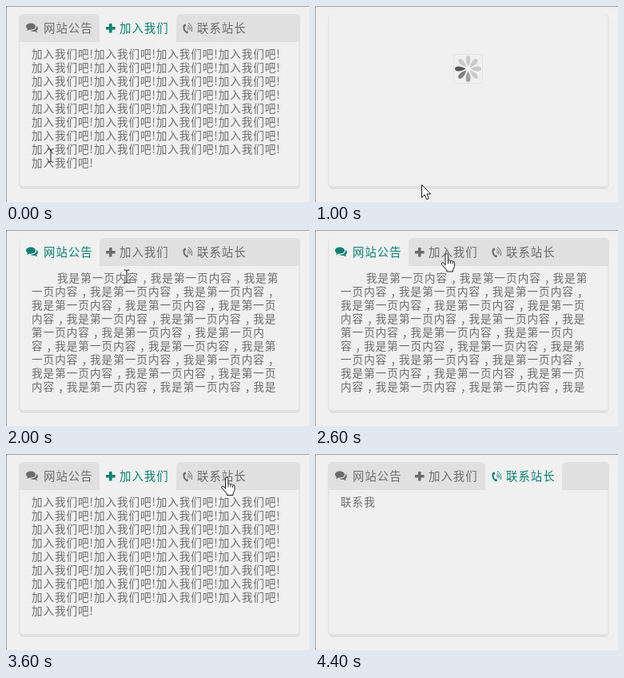
Animation of 379 by 245 pixels, one loop 5200 ms. Source, as an HTML page:

```html
<!DOCTYPE html>
<html lang="zh-CN">
<head>
<meta charset="utf-8">
<title>Tabs</title>
<style>
html, body { margin: 0; width: 100%; height: 100%; overflow: hidden; background: #f0f0f0; }
body {
  position: relative; color: #6c6c6c; white-space: pre; letter-spacing: 1px; text-spacing-trim: space-all;
  font-family: "Noto Sans CJK SC", "Noto Sans CJK", "Noto Sans CJK JP", sans-serif; font-weight: 350;
}
body > *, .tab, .tab *, .pad { position: absolute; box-sizing: border-box; }
#edge { inset: 0; border: solid #a2a2a2; border-width: 1px 0 0 1px; }
#panel {
  left: 16px; top: 10px; width: 352px; height: 219px; border-radius: 6px;
  border: solid #e6e6e6; border-width: 0 2px 4px; border-bottom-color: #e0e0e0;
}
#bar { left: 16px; top: 10px; width: 352px; height: 35px; }
.pad { top: 0; height: 35px; border-radius: 6px 6px 0 0; background: #e0e0e0; }
#before { left: 0; }
#after { right: 0; }
.tab { top: 0; height: 35px; }
.tab b { top: 0; font: inherit; font-size: 14.4px; line-height: 34px; }
.tab svg { left: 8px; top: 10px; fill: currentColor; }
.page { left: 32px; top: 51px; font-size: 13.6px; line-height: 17px; }
.page i { position: relative; left: 4px; top: 1px; font-style: normal; }
#join { letter-spacing: .92px; }
#spin { left: 173px; top: 60px; }
#cursor { left: 0; top: 0; overflow: visible; }
#cursor g { fill: #fff; stroke: #1c1c1c; stroke-linejoin: round; }
</style>
</head>
<body><div id="edge"></div><div id="panel"></div><div id="bar"><div class="pad" id="before"></div><div class="pad" id="after"></div></div><div class="page" id="news"></div><div class="page" id="join"></div><div class="page" id="contact">联系我</div><svg id="spin" width="38" height="38"><rect x=".5" y=".5" width="36" height="36" rx="4" fill="none" stroke="#e3e3e3"/></svg><svg id="cursor" width="379" height="245">
<g id="arrow"><path d="M.5 .5V16.5L4.2 13L6.8 18.7L9.4 17.6L6.9 12H11.8Z"/></g>
<g id="beam"><path fill="none" d="M-3.5-8H-1.5Q0-8 0-6.5Q0-8 1.5-8H3.5M0-6.5V6.5M-3.5 8H-1.5Q0 8 0 6.5Q0 8 1.5 8H3.5"/></g>
<g id="hand"><path d="M5.5 15V2.3a1.7 1.7 0 0 1 3.4 0V9q1.6-1.4 3 .6q1.8-1 2.6.7q2.4-.6 2.5 1.8v4.6l-2 4v2.3H7.3v-2L1 14.2q-.9-2.2 1.2-2.5q1.2 0 3.3 3z"/><path fill="none" d="M9 9v4M12 10v3M14.6 11v2.4"/></g>
</svg>
<script>
const $ = id => document.getElementById(id);
const GREY = '#6c6c6c', MID = '#3c7a72', TEAL = '#0b8071', BAR = 352;

const tabs = [
  { x: 1, w: 100, textX: 30, label: '网站公告',
    icon: '<path d="M6 1.5C9.3 1.5 12 3.3 12 5.6S9.3 9.7 6 9.7Q5 9.7 4.2 9.5Q2.8 10.8.9 11Q1.9 10 2 8.7Q0 7.5 0 5.6C0 3.3 2.7 1.5 6 1.5z"/><path d="M13.1 4.7Q15 6 15 8Q15 9.8 13.2 10.9Q13.3 12.2 14.2 13.2Q12.3 13 11 11.8Q8 12.4 5.7 10.9C10 10.9 13.4 8.7 13.1 4.7z"/>' },
  { x: 101, w: 96, textX: 25, label: '加入我们',
    icon: '<path d="M4 2H7.6V6H11.6V9.4H7.6V13.4H4V9.4H0V6H4z"/>' },
  { x: 197, w: 96, textX: 26, label: '联系站长',
    icon: '<path d="M3.4 2.2L4.4 5L2.4 6Q2.4 9 4 11.4L6 11L7 13.6Q6 14.6 4.6 14C1.8 12.6.3 9.5.4 6.3Q.6 2.8 3.4 2.2z"/><path fill="none" stroke="currentColor" d="M6.2 6.2Q7.6 7.6 6.9 9.4M6.7 3.8Q10.2 6.3 9 10.7M7.2 1.4Q12.8 4.9 11.3 12"/>' }
];
for (const t of tabs) {
  t.el = document.createElement('div');
  t.el.className = 'tab';
  t.el.style.cssText = `left:${t.x}px;width:${t.w}px`;
  t.el.innerHTML = `<svg width="16" height="16">${t.icon}</svg><b style="left:${t.textX}px">${t.label}</b>`;
  $('bar').append(t.el);
}

const phrase = '我是第一页内容，';
const lengths = [19, 21, 21, 21, 20, 21, 21, 21, 21];
let start = 0;
lengths.forEach((n, i) => {
  const line = document.createElement('div');
  line.innerHTML = phrase.repeat(30).slice(start, start += n).replaceAll('，', '<i>，</i>');
  if (!i) line.style.marginLeft = '32px';
  $('news').append(line);
});
$('join').textContent = ('加入我们吧!'.repeat(4) + '\n').repeat(8) + '加入我们吧!';

const petals = Array.from({ length: 8 }, (_, i) => {
  const p = document.createElementNS('http://www.w3.org/2000/svg', 'path');
  p.setAttribute('d', 'M0-3C-3.7-9-4-16.5 0-16.5S3.7-9 0-3z');
  p.setAttribute('transform', `translate(18.5 18.5) rotate(${i * 45})`);
  $('spin').append(p);
  return p;
});
const shades = ['#585858', '#7f7f7f', '#a0a0a0'];

// time, cursor kind, x, y
const moves = [
  [0, 'beam', 56, 187], [200], [800, 'arrow', 133, 223],
  [1600, 'beam', 141, 181], [1800, 'beam', 135, 100], [2000, 'beam', 151, 58],
  [2200, 'beam', 153, 52], [2600, 'hand', 157.5, 29], [3000, 'hand', 179.5, 28],
  [3200, 'hand', 245.5, 31], [3400, 'hand', 269, 28.5], [3600, 'hand', 269, 28.5],
  [3800, 'hand', 278, 28], [4000, 'hand', 231, 21.5], [4200, 'arrow', 147, -18], [4400]
];
// time, open tab (-1 while loading), its colour, spinner head
const views = [
  [0, 1, TEAL], [1000, -1, GREY, 6], [1200, -1, GREY, 0], [1400, 0, TEAL],
  [3000, 1, MID], [3200, 1, TEAL], [3800, 2, MID], [4000, 2, TEAL]
];
const at = (table, t) => table.findLast(row => row[0] <= t);
const show = (id, on) => $(id).style.display = on ? '' : 'none';

function draw(t) {
  const [, kind, x, y] = at(moves, t);
  for (const id of ['arrow', 'beam', 'hand']) show(id, id === kind);
  if (kind) $(kind).setAttribute('transform', `translate(${x} ${y})`);

  const [, open, colour, head] = at(views, t);
  show('bar', open >= 0);
  show('spin', open < 0);
  ['news', 'join', 'contact'].forEach((id, i) => show(id, i === open));
  tabs.forEach(({ el }, i) => el.style.color = i === open ? colour : GREY);
  if (open < 0) {
    petals.forEach((p, i) => p.setAttribute('fill', shades[(head - i + 8) % 8] || '#cacaca'));
  } else {
    const tab = tabs[open];
    $('before').style.width = (open ? tab.x : 0) + 'px';
    $('after').style.width = BAR - tab.x - tab.w + 'px';
  }
}

const begin = performance.now();
function tick() {
  draw((performance.now() - begin) % 5200);
  requestAnimationFrame(tick);
}
tick();
</script>
</body>
</html>
```
